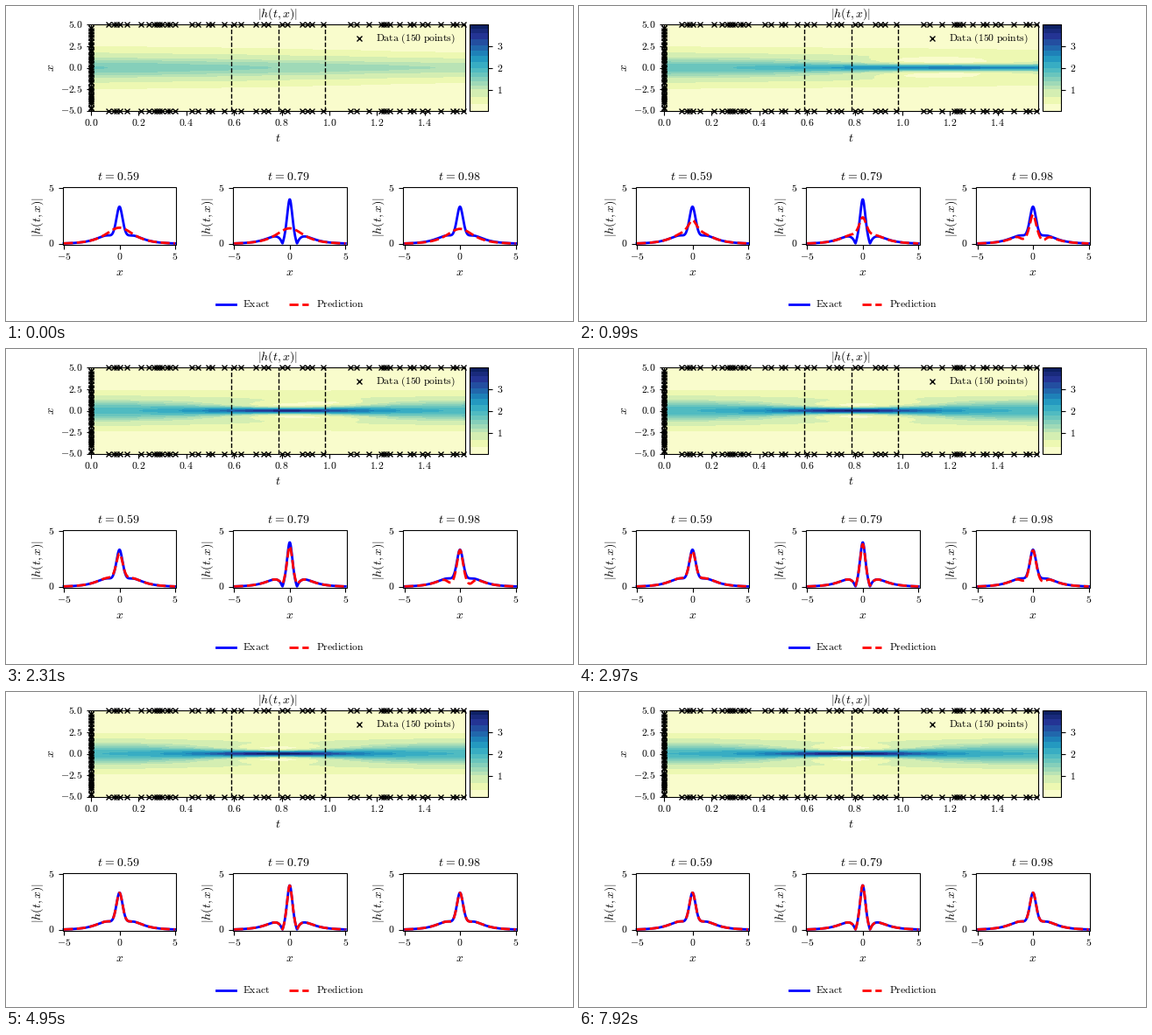
These frames come from a looping animation (647x360 px, 8 s). A matplotlib script:

```python
import numpy as np
import matplotlib.pyplot as plt
from matplotlib.animation import FuncAnimation
from matplotlib.colors import ListedColormap
from matplotlib.patches import Rectangle

plt.rcParams["mathtext.fontset"] = "cm"

W, H, DPI = 647, 360, 100
LOOP, TICK, HOLD = 8000, 40, 330      # ms
SMALL, LARGE = 8.45, 10               # font sizes in points

# The layout grid is a fraction of a pixel larger than the stage.
GRID_W, GRID_H = 647.56, 360.2
TOP, BOTTOM = H - 0.94 * GRID_H, H - 2 / 3 * GRID_H
LEFT, RIGHT = 0.15 * GRID_W, 0.85 * GRID_W
MAP_W = (RIGHT - LEFT - 5) / 1.05     # the colour bar takes 5 % plus a 5 px gap
MAP = (LEFT, LEFT + MAP_W, TOP, BOTTOM)
BAR = (LEFT + MAP_W + 5, RIGHT, TOP, BOTTOM)
PER_T = MAP_W / (np.pi / 2)

SLICE_W = 0.2 * GRID_W
SLICE_LEFT = [0.1 * GRID_W + 1.5 * SLICE_W * k for k in range(3)]
UNIT = SLICE_W / 10.2
SLICE_MID = H - GRID_H / 3
SLICE_TOP, SLICE_BOTTOM = SLICE_MID - 2.6 * UNIT, SLICE_MID + 2.6 * UNIT

VMIN, VMAX = 0.03, 4
x = np.linspace(-5, 5, 256)
t = np.linspace(0, np.pi / 2, 201)
slice_ids = (75, 100, 125)


def soliton(t, x):
    """|h| of the breather that starts as 2 sech(x)."""
    top = np.cosh(3 * x) + 3 * np.exp(4j * t) * np.cosh(x)
    return 4 * np.abs(top) / (np.cosh(4 * x) + 4 * np.cosh(2 * x) + 3 * np.cos(4 * t))


def prediction(s, t, x):
    """|h| of the network after s training steps."""
    broad = (1.6 - 0.27 * t) / np.cosh((0.87 + 0.08 * t**2) * x)
    mix = (1 - np.exp(-((s / 3.7) ** 1.15))) ** (1 + np.exp(-((t / 0.35) ** 2)))
    lag = np.exp(-((s / 4.7) ** 2))
    late = (1 - lag) * t + lag * 0.6 * np.tanh(t / 0.8)
    early = np.exp(-((s / 4) ** 2))
    depth = 0.8 * np.exp(-((s / 8) ** 2)) * (1 - np.exp(-((s / 1.8) ** 2)))
    dip = np.exp(-(((t - 1 - 0.25 * early) / (0.16 + 0.1 * early)) ** 2))
    dip = dip * np.exp(-(((np.abs(x) - 0.92) / 0.38) ** 2)) * (1 + 0.15 * np.tanh(2 * x))
    return np.abs((1 - mix) * broad + mix * soliton(late, x) - depth * dip)


def banded(name, bands):
    """Colour map cut into bands of equal colour distance."""
    rgb = plt.get_cmap(name)(np.linspace(0, 1, 256))[:, :3]
    arc = np.r_[0, np.cumsum(np.linalg.norm(np.diff(rgb, axis=0), axis=1))]
    arc /= arc[-1]
    middle = (np.minimum(np.floor(arc * bands), bands - 1) + 0.5) / bands
    return ListedColormap(np.stack([np.interp(middle, arc, c) for c in rgb.T], axis=1))


fig = plt.figure(figsize=(W / DPI, H / DPI), dpi=DPI, facecolor="white")
ax = fig.add_axes([0, 0, 1, 1])
ax.axis("off")
cmap = banded("YlGnBu", 16)


def label(px, py, s, size=SMALL, ha="center", va="baseline", **kw):
    ax.text(px, py, f"${s}$", fontsize=size, ha=ha, va=va, color="black", **kw)


def words(s):
    return r"\mathrm{" + s.replace(" ", r"\ ") + "}"


def segment(x0, y0, x1, y1, **kw):
    style = dict(color="black", lw=0.8, solid_capstyle="butt", zorder=4)
    style.update(kw)
    return ax.plot([x0, x1], [y0, y1], **style)[0]


def frame_box(left, right, top, bottom):
    ax.add_patch(Rectangle((left, top), right - left, bottom - top, fill=False,
                           ec="black", lw=0.8, zorder=4))


def x_tick(px, bottom, s):
    segment(px, bottom, px, bottom + 4.9)
    label(px, bottom + 17.3, s)


def y_tick(py, left, s):
    segment(left - 4.9, py, left, py)
    label(left - 9.7, py + 3.6, s, ha="right")


def picture(data, box):
    left, right, top, bottom = box
    return ax.imshow(data, extent=(left, right, bottom, top), origin="lower", cmap=cmap,
                     vmin=VMIN, vmax=VMAX, interpolation="nearest", aspect="auto", zorder=1)


# Heat map
heat = picture(np.zeros((x.size, t.size)), MAP)
frame_box(*MAP)
for k in range(8):
    x_tick(LEFT + 0.2 * k * PER_T, BOTTOM, f"{0.2 * k:.1f}")
for k in range(5):
    y_tick(TOP + (BOTTOM - TOP) * k / 4, LEFT, f"{5 - 2.5 * k:.1f}")
label(LEFT + MAP_W / 2 - 1, 12.9, "|h(t,x)|", LARGE)
label(LEFT + MAP_W / 2, 155, "t", LARGE)
label(51.3, 70.6, "x", LARGE, va="center", rotation=90)
for i in slice_ids:
    px = LEFT + t[i] * PER_T
    segment(px, BOTTOM, px, TOP, lw=1, ls="--", zorder=3)

# Training points
edge = [117, 123, 126, 130, 138, 154, 163, 169, 172, 175, 178, 184, 187, 193, 212, 219,
        231, 235, 249, 260, 268, 285, 294, 299, 315, 321, 338, 344, 349, 362, 393, 400,
        414, 428, 431, 434, 438, 449, 461, 465, 475, 481, 496, 510, 514, 522]
start = np.linspace(TOP + 2, BOTTOM - 2, 50)
start = start + np.random.default_rng(4).uniform(-2, 2, start.size)
mx = np.r_[edge, edge, np.full(start.size, LEFT), 403]
my = np.r_[np.full(len(edge), TOP), np.full(len(edge), BOTTOM), start, 36.5]
ax.plot(mx, my, "kx", ms=4, mew=1, zorder=5)
label(422.3, 40.3, words("Data (150 points)"), ha="left")

# Colour bar
picture(np.linspace(VMIN, VMAX, 256)[:, None], BAR)
frame_box(*BAR)
for v in (1, 2, 3):
    py = BOTTOM - (BOTTOM - TOP) * (v - VMIN) / (VMAX - VMIN)
    segment(RIGHT, py, RIGHT + 4.9, py)
    label(RIGHT + 9.4, py + 3.8, v, ha="left")


# Slices
def curve_y(h):
    return SLICE_BOTTOM - UNIT * (h + 0.1)


red = dict(color="red", lw=2, ls="--", zorder=3)
guesses = []
for left, i in zip(SLICE_LEFT, slice_ids):
    mid = left + SLICE_W / 2
    px = mid + UNIT * x
    ax.plot(px, curve_y(soliton(t[i], x)), color="blue", lw=2, zorder=2)
    guesses.append(ax.plot(px, curve_y(0 * x), **red)[0])
    frame_box(left, left + SLICE_W, SLICE_TOP, SLICE_BOTTOM)
    for v in (-5, 0, 5):
        x_tick(mid + UNIT * v, SLICE_BOTTOM, v)
    for v in (0, 5):
        y_tick(curve_y(v), left, v)
    label(mid - 1, 199, rf"t\hspace{{0.08}}=\hspace{{0.08}}{t[i]:.2f}", LARGE)
    label(mid, 307.5, "x", LARGE)
    label(left - 28.5, 241, "|h(t,x)|", LARGE, va="center", rotation=90)

# Legend
segment(239.6, 340.5, 261.8, 340.5, color="blue", lw=2, solid_capstyle="projecting")
segment(323.2, 340.5, 345.4, 340.5, **red)
label(270.3, 344.3, words("Exact"), ha="left")
label(353.8, 344.3, words("Prediction"), ha="left")

ax.set_xlim(0, W)
ax.set_ylim(H, 0)


def update(n):
    step = (n * TICK + TICK - 1) // HOLD
    field = prediction(step, t[None, :], x[:, None])
    heat.set_data(field)
    for line, i in zip(guesses, slice_ids):
        line.set_ydata(curve_y(field[:, i]))
    return [heat, *guesses]


anim = FuncAnimation(fig, update, frames=LOOP // TICK, interval=TICK, repeat=True,
                     repeat_delay=0, blit=False)
plt.show()
```
